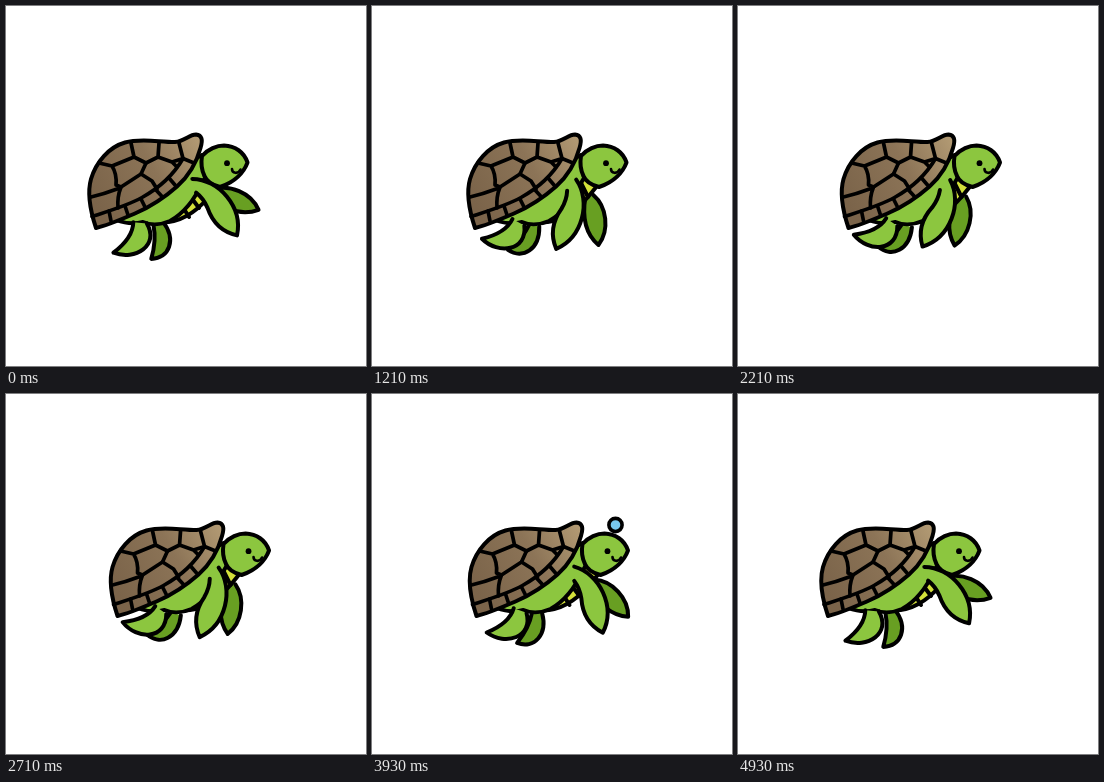
An HTML page that plays this animation: 360 by 360 pixels, repeating every 5000 ms.

```html
<!DOCTYPE html>
<html lang="en">
<head>
<meta charset="utf-8">
<title>Swimming turtle</title>
<style>
  html, body { margin: 0; width: 100%; height: 100%; overflow: hidden; background: #fff; }
  svg { display: block; width: 100vw; height: 100vh; }
  .ink { stroke: #000; stroke-width: 4; stroke-linecap: round; stroke-linejoin: round; }
  .line { fill: none; }
  .light { fill: #8cc63f; }
  .dark { fill: #689f22; }
  .belly { fill: #d3e03a; }
</style>
</head>
<body>
<svg viewBox="0 0 360 360">
  <defs>
    <linearGradient id="brown" gradientUnits="userSpaceOnUse" x1="88" y1="195" x2="196" y2="135">
      <stop offset="0" stop-color="#7b644a"/>
      <stop offset=".55" stop-color="#8c7457"/>
      <stop offset="1" stop-color="#b39b74"/>
    </linearGradient>
  </defs>
  <g id="turtle">
    <path id="farFront" class="ink dark" d="M2 -5C16 -16 40 -14 52 0C38 11 20 10 2 3"/>
    <path id="farRear" class="ink dark" d="M6 0Q20 -4 39 0C37 -18 18 -24 1 -9"/>

    <path class="ink belly" d="M150 216C172 219 190 206 203 191L212 180L198 170Z"/>
    <path class="ink line" d="M178 203L183 211M187 194L193 202M196 177L203 191"/>
    <path class="ink light" d="M110 214C118 217 126 219 137 216C146 220 157 218 164 215C178 207 188 195 196 177L199 172L196 149L185 155Z"/>

    <path class="ink light" d="M196 150C202 143 211 139.500 218 139.500C229 140 238 146 241.500 156.500C238 166 229 176 214 181C206 179 201 176 198.500 170C195 163 195 156 196 150Z"/>
    <circle cx="221" cy="157.200" r="2.900"/>
    <path class="ink line" style="stroke-width:2.6" d="M226 163C226 167.500 232 168.500 234.500 163.500"/>

    <path id="nearRear" class="ink light" d="M6 5Q18 -5 42 0C34 -22 6 -30 -2 -6"/>
    <path id="nearFront" class="ink light" d="M-5 -2C12 -22 49 -23 67 0C54 10 40 10 27 5Q17 2 8 4"/>

    <path class="ink" fill="url(#brown)" d="M90 222C84 204 81 187 85 173C90 156 103 141 119 136.500C135 132 152 136 169 136C179 135 183 128.500 190 128.500C196 129 197 134 194.500 142C191 155 185 168 171 180.500C158 192 146 200 130 207C116 213 103 219 90 222Z"/>
    <g class="ink line" style="stroke-width:3.7">
      <path d="M86 210.500C103 205 123 199 136 191.500C153 182 168 168 177 152.500L188 157"/>
      <path d="M103 205L105 215M119 200L122 209M135 193L139 201M150 184L156 190.500M163 172L169 179"/>
      <path d="M93 157L106 160L128 151L140 157L135 168L115 181L110 179Q111 168 106 160M128 151L125 137"/>
      <path d="M85 191Q98 188 111 183M115 181Q111 191 112 202M135 168L146 175L151 183"/>
      <path d="M140 157L152 151L153 137M152 151L166 156L171 161M166 156L177 152.500L173 137"/>
    </g>
    <circle id="bubble" class="ink" cx="229" fill="#78c8ef"/>
  </g>
</svg>
<script>
const LOOP = 5000;
const $ = id => document.getElementById(id);
const times = [0, 570, 1210, 2210, 3140, 3930, 4930];
const drift = [0, 5.5, 13, 20.5, 20.8, 14.5, 0];
const limbs = [
  { el: $('nearFront'), x: 188, y: 178, turn: [50, 82, 104.5, 111, 93, 65, 50] },
  { el: $('farFront'), x: 203, y: 188, turn: [17.7, 48, 78.4, 97.7, 82, 42, 17.7] },
  { el: $('nearRear'), x: 135, y: 215, turn: [131, 140, 155, 161, 160, 146, 131] },
  { el: $('farRear'), x: 148, y: 214, turn: [94, 107, 130, 137, 135, 116.5, 94] }
];
const puffs = [3040, 3740];
const clamp = v => Math.max(0, Math.min(1, v));

function slope(v, i) {
  const last = times.length - 1;
  if (i === last) return 0;
  const a = Math.max(0, i - 1), b = i + 1;
  return (v[b] - v[a]) / (times[b] - times[a]);
}

// Smooth cubic through the key poses; rests on the last one.
function sample(v, t) {
  const last = times.length - 1;
  if (t >= times[last]) return v[last];
  let i = 0;
  while (t >= times[i + 1]) i++;
  const d = times[i + 1] - times[i], s = (t - times[i]) / d, r = 1 - s;
  return r * r * (1 + 2 * s) * v[i] + s * s * (3 - 2 * s) * v[i + 1] +
    d * s * r * (r * slope(v, i) - s * slope(v, i + 1));
}

function drawBubble(t) {
  const start = puffs.find(p => t >= p && t < p + 600);
  const el = $('bubble');
  el.style.display = start === undefined ? 'none' : '';
  if (start === undefined) return;
  const age = t - start;
  const size = clamp(age / 150) * clamp((600 - age) / 70);
  el.setAttribute('cy', 131 - 7 * clamp((age - 190) / 310));
  el.setAttribute('r', 6.6 * size);
  el.style.strokeWidth = 3.6 * Math.min(1, size * 1.6);
}

function draw(now) {
  const t = now % LOOP;
  $('turtle').setAttribute('transform', `translate(${sample(drift, t)} 0)`);
  for (const { el, x, y, turn } of limbs)
    el.setAttribute('transform', `translate(${x} ${y}) rotate(${sample(turn, t)})`);
  drawBubble(t);
}

const begin = performance.now();
function tick() {
  draw(performance.now() - begin);
  requestAnimationFrame(tick);
}
tick();
</script>
</body>
</html>
```
